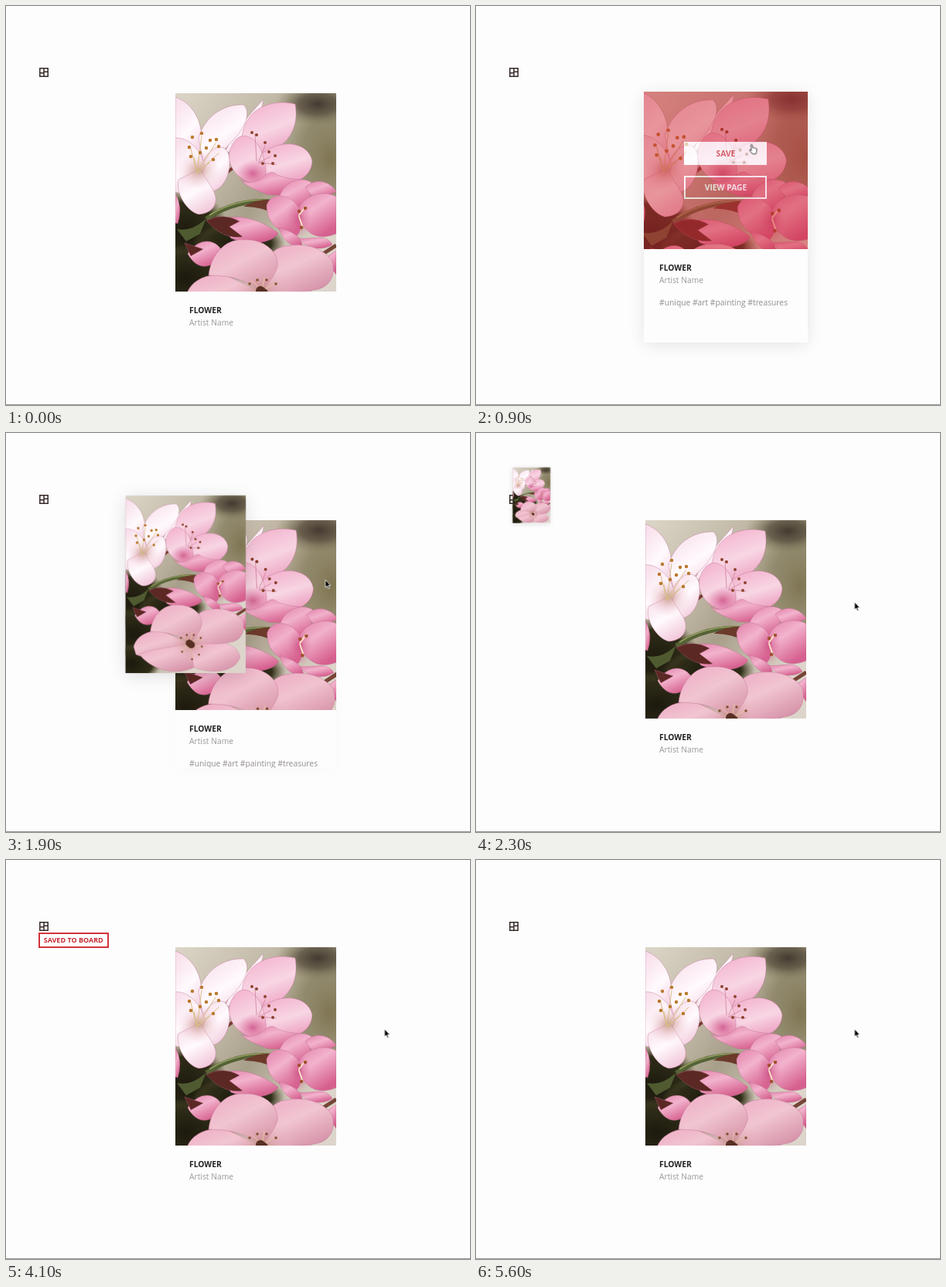
These frames come from a looping animation (600x517 px, 5.7 s). An HTML page:

```html
<!DOCTYPE html>
<html lang="en">
<head>
<meta charset="utf-8">
<title>Save to board</title>
<style>
@property --open { syntax: "<number>"; inherits: true; initial-value: 0; }

html, body { margin: 0; width: 100%; height: 100%; overflow: hidden; }
body { position: relative; background: #fefdfe; font: 10.3px/15.6px "Open Sans", sans-serif; }
body > *, .overlay { position: absolute; }
svg { display: block; overflow: visible; }
p { margin: 0; white-space: nowrap; }
b { font-weight: 700; }

.rule { left: 0; top: 516px; width: 100%; height: 1px; background: #969696; }
.icon { left: 43px; top: 80px; }

/* --open runs from 0 (resting) to 1 (hovered) */
.card, .shade {
  left: calc(219px - 3.5px * var(--open));
  top: calc(113px - 3px * var(--open));
  width: calc(208px + 7px * var(--open));
  height: calc(320px + 7px * var(--open));
  animation: open 5.7s infinite;
}
.card { overflow: hidden; background: #fefdfe; }
.shade { box-shadow: 0 3px 20px rgb(0 0 0 / calc(.15 * var(--open))); }
.photo { position: relative; overflow: hidden; height: calc(257px - 76.5px * var(--open)); }
.photo svg {
  transform-origin: 0 0;
  transform: translate(calc(-7px * var(--open)), calc(-8px * var(--open))) scale(calc(1 + .1 * var(--open)));
}
.overlay {
  inset: 0;
  display: flex; flex-direction: column; align-items: center; justify-content: center; gap: 14px;
  background: rgb(207 42 52 / .76);
  opacity: calc(1.15 * var(--open) - .15);
}
.button {
  box-sizing: border-box; width: 107px; height: 30px;
  border: 2px solid #fff; color: #fff;
  font-weight: 700; line-height: 26px; text-align: center;
}
.solid { background: #fff; color: #c4202a; }
.caption { padding: 17px 0 0 calc(18px + 3.5px * var(--open)); color: #999; }
.caption b { color: #222; }
.tags { margin-top: 13.4px; color: #918d8c; }

.copy {
  left: 0; top: 0; width: 208px; height: 308px; overflow: hidden;
  transform-origin: 0 0; box-shadow: 0 4px 30px rgb(0 0 0 / .13);
  animation: fly 5.7s linear infinite;
}
.badge {
  box-sizing: border-box; left: 41.5px; top: 94px; width: 91.5px; height: 19.5px;
  border: 2px solid #d2333a; background: #fff; color: #c4262e;
  font-size: 9px; font-weight: 700; line-height: 15.5px; text-align: center;
  animation: notice 5.7s infinite;
}
.cursor { left: 0; top: 0; animation: move 5.7s linear infinite; }
.cursor path { stroke: #fff; stroke-width: .8; }
.arrow { animation: arrow 5.7s step-end infinite; }
.hand { animation: hand 5.7s step-end infinite; }

@keyframes open {
  0%, 12.3% { --open: 0; animation-timing-function: ease-out; }
  19.3% { --open: 1; }
  29.8% { --open: 1; animation-timing-function: linear; }
  31.58% { --open: .55; animation-timing-function: linear; }
  33.33% { --open: .14; animation-timing-function: linear; }
  35.1%, 100% { --open: 0; }
}
@keyframes fly {
  0%, 29.8% { transform: translate(219px, 113px); opacity: 0; }
  29.83% { transform: translate(219px, 113px); opacity: 1; }
  31.58% { transform: translate(191px, 100px) scale(.9); }
  33.33% { transform: translate(155px, 81px) scale(.75); }
  35.09% { transform: translate(115px, 62px) scale(.57); }
  36.84% { transform: translate(78px, 46px) scale(.4); }
  38.6% { transform: translate(55px, 40px) scale(.29); }
  42.1% { transform: translate(40px, 49px) scale(.18); }
  45.61% { transform: translate(40px, 67px) scale(.09); opacity: 1; }
  48.2%, 100% { transform: translate(48.5px, 86px) scale(0); opacity: 0; }
}
@keyframes notice {
  0%, 47.4% { opacity: 0; transform: translateY(-3px); }
  50.9%, 77.2% { opacity: 1; transform: none; }
  82.5%, 100% { opacity: 0; transform: none; }
}
@keyframes move {
  0%, 1.75% { transform: translate(545px, 197px); }
  8.77% { transform: translate(420px, 162px); }
  10.53% { transform: translate(408px, 159px); }
  14.04% { transform: translate(372px, 172px); }
  17.54%, 28.1% { transform: translate(339px, 187px); }
  31.58% { transform: translate(382px, 187px); }
  33.33% { transform: translate(412.5px, 190px); }
  36.84% { transform: translate(468px, 208px); }
  40.35%, 100% { transform: translate(489.5px, 219px); }
}
@keyframes arrow {
  0% { visibility: hidden; }
  1.75% { visibility: visible; }
  15.8% { visibility: hidden; }
  31%, 100% { visibility: visible; }
}
@keyframes hand {
  0% { visibility: hidden; }
  15.8% { visibility: visible; }
  31%, 100% { visibility: hidden; }
}
</style>
</head>
<body>

<svg width="0" height="0">
  <defs>
    <linearGradient id="wall" x2=".9" y2="1">
      <stop offset="0" stop-color="#dcd6c8"/><stop offset=".3" stop-color="#c3bba9"/>
      <stop offset=".5" stop-color="#a89f8a"/><stop offset=".8" stop-color="#ddd5cb"/>
    </linearGradient>
    <radialGradient id="dusk">
      <stop offset="0" stop-color="#443a31"/><stop offset=".45" stop-color="#5d5443" stop-opacity=".85"/>
      <stop offset="1" stop-color="#8d8863" stop-opacity="0"/>
    </radialGradient>
    <radialGradient id="olive">
      <stop offset="0" stop-color="#7f7552"/><stop offset=".6" stop-color="#878060" stop-opacity=".7"/>
      <stop offset="1" stop-color="#8d8863" stop-opacity="0"/>
    </radialGradient>
    <radialGradient id="leaf">
      <stop offset="0" stop-color="#1c190e"/><stop offset=".7" stop-color="#2f2d18"/>
      <stop offset="1" stop-color="#55522f" stop-opacity="0"/>
    </radialGradient>
    <radialGradient id="throat">
      <stop offset="0" stop-color="#b98a6c" stop-opacity=".75"/><stop offset=".5" stop-color="#dba3a9" stop-opacity=".35"/>
      <stop offset="1" stop-color="#eebfce" stop-opacity="0"/>
    </radialGradient>
    <radialGradient id="rose">
      <stop offset="0" stop-color="#c9487f" stop-opacity=".75"/><stop offset="1" stop-color="#e07fa8" stop-opacity="0"/>
    </radialGradient>
    <linearGradient id="white" x1=".2" x2=".7" y2="1">
      <stop offset="0" stop-color="#f8dfeb"/><stop offset=".5" stop-color="#fffafd"/><stop offset="1" stop-color="#f1c6d9"/>
    </linearGradient>
    <linearGradient id="blush" x1=".2" x2=".6" y2="1">
      <stop offset="0" stop-color="#f3b2ce"/><stop offset=".55" stop-color="#f8d6e4"/><stop offset="1" stop-color="#eda2c2"/>
    </linearGradient>
    <linearGradient id="pink" x2=".6" y2="1">
      <stop offset="0" stop-color="#e27fa9"/><stop offset=".45" stop-color="#f2b3cd"/><stop offset="1" stop-color="#d6608f"/>
    </linearGradient>
    <linearGradient id="pale" x2=".7" y2="1">
      <stop offset="0" stop-color="#eeaac4"/><stop offset=".5" stop-color="#f1c5d1"/><stop offset="1" stop-color="#d794aa"/>
    </linearGradient>

    <symbol id="blossom" viewBox="0 0 208 308">
      <rect width="208" height="308" fill="url(#wall)"/>
      <ellipse cx="200" cy="85" rx="60" ry="90" fill="url(#olive)"/>
      <ellipse cx="184" cy="14" rx="55" ry="30" fill="url(#dusk)"/>
      <ellipse cx="14" cy="182" rx="56" ry="58" fill="url(#leaf)"/>
      <ellipse cx="14" cy="240" rx="62" ry="44" fill="url(#leaf)"/>
      <ellipse cx="10" cy="292" rx="52" ry="34" fill="url(#leaf)"/>
      <ellipse cx="82" cy="195" rx="60" ry="28" fill="url(#leaf)"/>
      <path d="M2 176Q22 180 40 162L32 182 14 192Z" fill="#4f5a30"/>
      <path d="M208 197L188 210" stroke="#754638" stroke-width="5"/>
      <path d="M40 163C65 145 98 137 127 141" fill="none" stroke="#566236" stroke-width="6"/>
      <path d="M44 158C68 143 98 136 124 139" fill="none" stroke="#94a05f" stroke-width="1.5"/>
      <path d="M60 108L78 94" stroke="#7a3b31" stroke-width="4"/>
      <path d="M88 147Q110 134 133 140L131 157Q108 146 88 147Z" fill="#6b3a2a"/>

      <g stroke="#b8668c" stroke-opacity=".55" stroke-width=".7">
        <g fill="url(#white)">
          <path d="M0 5C20 12 33 32 34 56L40 92 0 74Z"/>
          <path d="M62 82C70 60 86 38 114 8 110 30 98 50 74 72Z"/>
          <path d="M30 58C38 30 62 14 88 15 98 24 92 44 70 66L38 98Z"/>
          <path d="M34 92C46 66 66 62 70 84 72 108 60 130 38 128Z"/>
          <path d="M0 58C14 56 34 72 38 96 30 120 14 134 0 128Z"/>
          <path d="M4 112C0 126 12 152 30 157 50 156 58 140 48 124L32 98Z"/>
        </g>
        <path d="M0 130Q10 148 3 169L0 168Z" fill="url(#pink)"/>
        <g fill="url(#blush)">
          <path d="M86 56C90 24 118 6 155 14 160 44 148 66 116 80Z"/>
          <path d="M110 80C134 58 172 62 177 88 176 114 142 126 112 106Z"/>
          <path d="M70 76C78 48 98 50 110 72 120 95 118 112 112 119 88 118 66 100 70 76Z"/>
        </g>
        <path d="M85 113C112 124 118 92 132 106 150 113 160 110 164 113 156 131 132 134 118 131 104 125 94 122 85 113Z" fill="url(#pink)"/>

        <g fill="url(#pink)">
          <path d="M134 137C138 114 166 104 180 119L166 152Z"/>
          <path d="M168 122C184 106 204 118 208 128L180 138Z"/>
          <path d="M158 153C166 129 194 126 208 134V182C190 190 166 188 158 153Z"/>
          <path d="M118 145C125 126 150 130 162 152 166 182 156 190 148 184 128 176 118 164 118 145Z"/>
          <path d="M134 174C152 180 162 184 165 200 150 200 138 190 134 174Z"/>
          <path d="M160 188C178 190 194 181 203 196 190 205 170 202 160 188Z"/>
          <path d="M56 166C72 156 102 158 133 181 126 195 95 198 72 188Z"/>
          <path d="M16 208C26 192 48 183 61 205 52 226 30 234 16 208Z"/>
          <path d="M193 214L208 204V235Z"/>
        </g>
        <path d="M40 165Q62 154 83 166L70 173 87 186Q62 190 40 165Z" fill="#5c2823"/>
        <path d="M12 194L36 202 20 211Z" fill="#5c2823"/>

        <g fill="url(#pale)">
          <path d="M14 262C20 240 48 230 70 238L112 258C96 276 44 288 18 276Z"/>
          <path d="M24 276C48 264 84 264 112 256L122 296C96 312 50 308 24 276Z"/>
          <path d="M112 256C150 246 194 254 198 280 190 308 146 310 118 298Z"/>
          <path d="M110 258C108 224 122 200 144 198 164 194 188 198 202 216 208 232 202 250 184 254 160 260 130 256 110 258Z"/>
          <path d="M43 236C46 208 66 188 88 190 112 188 134 204 132 224 128 240 116 250 111 258 92 240 66 236 43 236Z"/>
        </g>
      </g>

      <g>
        <ellipse cx="30" cy="100" rx="28" ry="25" fill="url(#throat)"/>
        <ellipse cx="100" cy="104" rx="22" ry="18" fill="url(#rose)"/>
        <ellipse cx="160" cy="162" rx="16" ry="26" fill="url(#rose)"/>
        <ellipse cx="112" cy="257" rx="40" ry="36" fill="url(#throat)"/>
      </g>

      <g fill="none" stroke-linecap="round">
        <path d="M28 103L20 72M28 103L34 56M28 103L52 65M28 103L56 78M28 103L44 90M28 103L24 84" stroke="#d6bf87"/>
        <path d="M105 88L103 53M108 88L116 68M108 90L123 82M108 90L130 92" stroke="#cf7f99" stroke-width=".8"/>
        <path d="M160 158L168 147M160 160L164 172" stroke="#fbe3c6" stroke-width="2"/>
        <path d="M112 256L98 242M112 256L115 238M112 256L130 246M112 256L132 264M112 256L116 282M112 256L97 270" stroke="#e3c3a3"/>
        <path d="M18 70h0M22 57h0M34 52h0M45 61h0M53 60h0M56 69h0M40 71h0M32 77h0M49 86h0M20 82h0" stroke="#b97a2e" stroke-width="4.5"/>
        <path d="M99 51h0M105 54h0M116 64h0M121 76h0M129 81h0M113 91h0M126 91h0" stroke="#8e4331" stroke-width="4"/>
        <path d="M168 149h0M160 153h0M163 174h0" stroke="#a2502f" stroke-width="4.5"/>
        <path d="M110 256l4 3" stroke="#583024" stroke-width="12"/>
        <path d="M96 247h0M106 242h0M118 242h0M130 247h0M132 262h0M127 276h0M115 284h0M98 271h0" stroke="#80512f" stroke-width="3.5"/>
      </g>
    </symbol>
  </defs>
</svg>

<div class="rule"></div>
<svg class="icon" width="12" height="12" fill="none" stroke="#352a27" stroke-width="1.5">
  <path d="M.8 .8H11.2V11.2H.8ZM6 1V11M1 6.8H6M6 5.2H11"/>
</svg>

<div class="shade"></div>
<div class="card">
  <div class="photo">
    <svg width="208" height="308"><use href="#blossom"/></svg>
    <div class="overlay">
      <div class="button solid">SAVE</div>
      <div class="button">VIEW PAGE</div>
    </div>
  </div>
  <div class="caption">
    <p><b>FLOWER</b></p>
    <p>Artist Name</p>
    <p class="tags">#unique #art #painting #treasures</p>
  </div>
</div>

<div class="badge">SAVED TO BOARD</div>
<div class="copy"><svg width="208" height="308"><use href="#blossom"/></svg></div>

<svg class="cursor" width="1" height="1">
  <path class="arrow" d="M0 0V10L2.2 8 3.7 11.6 5.3 10.9 3.8 7.4H6.8Z"/>
  <path class="hand" fill="#fff" style="stroke:#111" d="M0 1.2C-.2-.4 1.8-.6 2 1L2.6 4.2Q3.8 3.4 4.5 4.6 5.6 3.8 6.3 5 7.6 4.6 7.8 6.2L7.4 9.6 6.6 12H2L-1.6 7.4Q-1.8 6 0 6.8L.9 7.4Z"/>
</svg>

</body>
</html>
```
